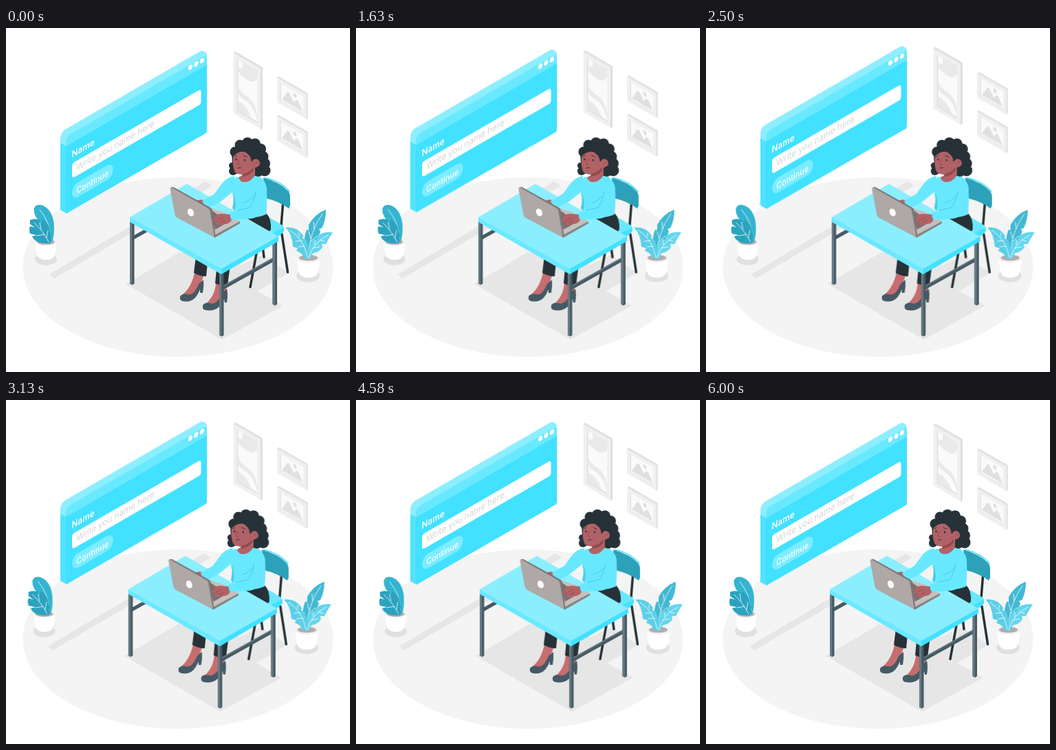
Recreate the animation shown at these times as an HTML page. Size 500x500 px, loop 6.04 s.

```html
<!DOCTYPE html>
<html lang="en">
<head>
<meta charset="utf-8">
<title>Name form</title>
<style>
html, body { margin: 0; width: 100%; height: 100%; overflow: hidden; background: #fff; }
svg { display: block; width: 100vw; height: 100vh; }
text { font-family: Inter, Roboto, sans-serif; font-weight: 500; }
.float { animation: float 6040ms linear infinite; }
.shake { animation: shake 6040ms linear infinite; }
/* four 1.5 s bobs, then a short rest */
@keyframes float {
  0%, 24.834%, 49.669%, 74.503%, 99.338%, 100% { transform: translateY(0); }
  12.417%, 37.252%, 62.086%, 86.921% { transform: translateY(-10px); }
}
/* one 6 s sway that grows and fades, then a short rest */
@keyframes shake {
  0%, 99.338%, 100% { transform: translateX(0); }
  9.934%, 89.404% { transform: translateX(-1px); }
  19.868%, 79.47% { transform: translateX(2px); }
  29.801%, 49.669%, 69.536% { transform: translateX(-4px); }
  39.735%, 59.603% { transform: translateX(4px); }
}
.line { fill: none; stroke-linecap: round; stroke-linejoin: round; }
.vein { fill: none; stroke: #fff; stroke-width: .8; stroke-linecap: round; }
.skin { fill: #b16266; }
.shin { fill: #c66d70; }
.hair { fill: #263238; }
.cloth { fill: #68e8ff; }
</style>
</head>
<body>
<svg viewBox="0 0 500 500">
  <defs>
    <g id="picture" transform="matrix(.866 .5 0 1 0 0)">
      <path fill="#e0e0e0" d="M0 0l3-3 48.500 0v36l-2 3z"/>
      <rect width="49" height="36" fill="#f0f0f0"/>
      <rect x="5" y="5" width="39" height="26" fill="#e0e0e0"/>
      <rect x="6.500" y="5" width="37.500" height="25" fill="#fafafa"/>
      <path fill="#e0e0e0" d="M8 28l9-15q2-2 4 0l7 9 4-5q2-2 4 0l7 11z"/>
      <circle cx="30" cy="11" r="3" fill="#e0e0e0"/>
    </g>
    <circle id="dot" r="3.600" fill="#fff" transform="matrix(.866 -.5 0 1 0 0)"/>
  </defs>

  <ellipse cx="250" cy="347.500" rx="225.500" ry="130.500" fill="#f4f4f4"/>

  <g class="float">
    <!-- browser window -->
    <path fill="#50e3ff" d="M79 160L88 165V269.500L79 264.500z"/>
    <path fill="#41e1ff" d="M87 168L292 50V149Q292 152 289.500 153.500L88 269.500L87 269z"/>
    <path fill="#8deeff" d="M79 167V161Q79 152 86 147.500L281 34.500Q284 32 287 33.500L290 35.500Q292.500 37 292 42L288 46L90 160L87 171.500z"/>
    <path fill="#69e9ff" d="M87 172V167Q87 158 94 154L287 42Q292 39.500 292 44V53.500z"/>
    <use href="#dot" transform="translate(268 57.200)"/>
    <use href="#dot" transform="translate(276.400 52.400)"/>
    <use href="#dot" transform="translate(284.800 47.500)"/>
    <g transform="matrix(.866 -.5 0 1 96 188)">
      <text x="-.5" y=".5" font-size="13.500" style="font-weight:600" fill="#fff">Name</text>
      <rect y="8.700" width="216.500" height="22" rx="4" fill="#fff"/>
      <text x="7.200" y="23.500" font-size="13.400" style="font-weight:400" fill="#d6d6d6">Write you name here</text>
      <rect y="41" width="69" height="21.500" rx="10.700" fill="#7eecff"/>
      <text x="7.300" y="57" font-size="12.500" fill="#fff">Continue</text>
    </g>

    <!-- wall pictures -->
    <g transform="matrix(.866 .5 0 1 330.500 36)">
      <path fill="#e0e0e0" d="M0 0l3-3.500h46V85l-3 4z"/>
      <rect width="45.500" height="88" fill="#f0f0f0"/>
      <rect x="6" y="6" width="34" height="76" fill="#e0e0e0"/>
      <rect x="8" y="6" width="32" height="74" fill="#fafafa"/>
      <path fill="#e9e9e9" d="M15 6H40V16Q36 27 25 28Q14 28 8 23V17Q19 17 15 6zM8 45Q14 53 24 52Q36 53 40 70V78Q34 60 20 59Q12 59 8 55zM8 66Q22 65 31 80H8z"/>
    </g>
    <use href="#picture" transform="translate(394 72)"/>
    <use href="#picture" transform="translate(394 128)"/>
  </g>

  <g class="shake">
    <!-- floor shapes -->
    <path fill="#e6e6e6" d="M63 358L290 223L300 229L70 364z"/>
    <path fill="#e6e6e6" d="M174 372L252 326L338 340L365 382L403 403.500L314 453z"/>
    <path fill="#e6e6e6" d="M320 355L366 382L411 356L372 330z"/>

    <!-- left plant -->
    <ellipse cx="58" cy="336" rx="16" ry="9" fill="#e0e0e0"/>
    <path fill="#fff" d="M43 311Q43 325 46 332Q50 337 58 337Q67 337 70 332Q73 325 73 311z"/>
    <ellipse cx="58" cy="311" rx="15" ry="5.500" fill="#f0f0f0"/>
    <ellipse cx="58" cy="311" rx="12.500" ry="4" fill="#b5abab"/>
    <path fill="#33b4d0" d="M64 312Q57 300 53 285Q40 275 40.500 263Q43 255 52 257.500Q66 262 69.500 283Q71 301 67 311z"/>
    <path class="vein" d="M65 306Q65 283 49 264"/>
    <path fill="#2ba3bf" d="M60 313Q43 314 38 303L45 301L35 299Q33 293 35 288L42 290L35 285V279Q42 276 49 279L50 284L53 278Q62 283 64 294Q67 306 64 313z"/>
    <path class="vein" d="M62 311Q54 295 41 283M56 300L45 302M51 292L49 283M59 305L61 294"/>

    <!-- chair -->
    <g class="line" stroke="#263238" stroke-width="3.500">
      <path d="M403 250L400 287M401 300L409.500 355M365 322L355 376.500M373 318L375 333"/>
    </g>
    <path fill="#2ca1b9" d="M374 217.500Q398 224 410 237Q413 240 413 246V258L411 262.500Q398 252 376 247z"/>
    <path class="line" stroke="#45dffc" stroke-width="1.600" d="M377 217.500Q400 223 412 237.500"/>
    <path class="cloth" d="M350 288L384 276L402 287Q405 290 403 293L382 304z"/>
    <path fill="#41e1ff" d="M378 303L404 290V295Q402 299 395 303L386 308z"/>

    <!-- legs -->
    <path class="shin" d="M274 356L287 361L282 374Q279 385 270 390L256 388Q269 378 274 356z"/>
    <path class="shin" d="M305 370L321 373Q320 384 314 393Q307 402 289 402Q304 390 305 370z"/>
    <path fill="#455a64" d="M253 390Q257 385 263 387Q273 390 280 372L287 366Q288 375 286 385L282 385V380Q276 395 267 397Q255 399 253 394z"/>
    <path fill="#455a64" d="M286 403Q289 398 296 400Q307 403 314 385L321 379Q323 387 321 399L318 399L317 394Q311 408 301 410Q288 412 286 407z"/>
    <path class="hair" d="M277 324L294 331L291 361Q282 361 273 356zM307 340L326 344L322 374Q312 375 304 371z"/>
    <path class="hair" d="M340 270L378 269Q386 277 385 293L380 299L340 286z"/>

    <!-- body -->
    <path class="cloth" d="M335 216Q346 220 361 213Q377 217 379 234Q380 255 378 271Q360 279 336 272Q332 262 333 249Q325 238 331 220z"/>
    <path fill="#42cde9" d="M331 241Q335 251 333 267L329 262Q332 250 330 242z"/>

    <!-- head -->
    <g class="hair">
      <path d="M328 182L345 165L370 172L380 192L378 211L362 215L330 211z"/>
      <circle cx="333" cy="180" r="7.500"/><circle cx="340" cy="170" r="7.500"/>
      <circle cx="351" cy="167" r="8"/><circle cx="362" cy="168.500" r="8"/>
      <circle cx="370" cy="176" r="8"/><circle cx="373" cy="187" r="8.500"/>
      <circle cx="376" cy="197" r="8"/><circle cx="376" cy="207" r="8.500"/>
      <circle cx="367" cy="209" r="7"/><circle cx="328.500" cy="200" r="4.500"/>
      <circle cx="330" cy="208" r="6"/>
    </g>
    <path class="skin" d="M344 200H362V214Q356 224 346 224Q340 224 338 217L344 214z"/>
    <path fill="#964749" d="M344 211Q354 209 359 201L360 207Q354 215 343 216z"/>
    <path class="skin" d="M331 184Q340 178 346 176Q355 181 358 193Q361 189 366 191Q371 195 368 200Q364 204 359 203Q354 211 343 212.500Q335 213 332 208Q328 197 331 184z"/>
    <path class="hair" d="M328 186Q331 174 344 174Q356 174 360 191L357 195Q356 184 347 180Q338 179 332 185z"/>
    <ellipse cx="334.500" cy="191" rx="1.200" ry="1.600" fill="#263238"/>
    <ellipse cx="347" cy="192" rx="1.200" ry="1.600" fill="#263238"/>
    <path class="line" stroke="#263238" stroke-width=".9" d="M332 187L335 185.500M345 185.500L350 187.500M337 203.500Q339.500 203 342 203"/>
    <path class="line" stroke="#964749" stroke-width=".9" d="M339 191L337 198L340 198.500M363 197Q364 194 366 195"/>

    <!-- table -->
    <g class="line" stroke-width="5" style="stroke-linecap:butt">
      <path stroke="#455a64" d="M183 306L208 292"/>
      <path stroke="#455a64" d="M313 379L390 336"/>
      <path stroke="#687a83" stroke-width="2" d="M313 376.500L390 333.500"/>
    </g>
    <g fill="#455a64">
      <path d="M180 280h6.500v91.500l-3 2-3.500-2z"/>
      <path d="M310 352h6.500v94.500l-3 2-3.500-2z"/>
      <path d="M387.500 308h6.500v93.500l-3 2-3.500-2z"/>
    </g>
    <g fill="#687a83">
      <path d="M180 280h3.300v93l-3.300-1.700z"/>
      <path d="M310 352h3.300v96l-3.300-1.700z"/>
      <path d="M387.500 308h3.300v95l-3.300-1.700z"/>
    </g>
    <path fill="#69e9ff" d="M180 275L313 349V358L180 282z"/>
    <path fill="#41e1ff" d="M313 349L396 302V310L313 358z"/>
    <path fill="#8beeff" d="M180 275L263 226.500L396 303L313 350z"/>

    <!-- far arm -->
    <path class="skin" d="M276 252Q283 247 291 252L296 258L288 263z"/>
    <path class="cloth" d="M332 215Q321 217 314 226L303 241L285 251.500Q288 259 295 261L311 253Q324 243 333 235z"/>

    <!-- laptop -->
    <path fill="#c6bfbd" d="M295 261L317 268L340 281L303 301z"/>
    <path fill="#898280" d="M303 301L340 281V284L304 304.500z"/>
    <path fill="#77706f" d="M296 263L323 282L304 293z"/>
    <path fill="#7d7675" d="M239 232L243 231L297 261Q299 262 300 265L304.500 303L303 305z"/>
    <path fill="#aea8a7" d="M238.500 234Q238 231 241 232L294 262Q296 263 296.500 266L303 304.500L249 276Q246 274 245.500 271z"/>
    <ellipse cx="268.500" cy="268" rx="4.300" ry="5.800" transform="rotate(-25 268.500 268)" fill="#fff"/>

    <!-- near arm -->
    <path class="skin" d="M326 271L314 270Q306 270 303 275L301 281Q304 283 309 279L305 285Q310 288 317 285Q325 285 328 279z"/>
    <path class="line" stroke="#964749" stroke-width=".8" d="M309 279L315 276M312 283L318 280"/>
    <path class="cloth" d="M369 219Q378 222 379 233Q378 254 371 268Q367 275 357 277L328 279Q325 274 326 268L352 262Q360 252 362 236z"/>
    <path class="line" stroke="#42cde9" stroke-width="1" d="M363 238Q361 252 354 261L337 265M345 254Q356 251 360 244"/>

    <!-- right plant -->
    <ellipse cx="439" cy="360" rx="17" ry="9.500" fill="#e0e0e0"/>
    <path fill="#fff" d="M423 335Q423 350 427 358Q431 363 439 363Q448 363 452 358Q456 350 456 335z"/>
    <ellipse cx="439.500" cy="335" rx="16.500" ry="6" fill="#f0f0f0"/>
    <ellipse cx="439.500" cy="334" rx="13.500" ry="4.300" fill="#b5abab"/>
    <path fill="#42b9d4" d="M437 335Q430 312 437 293L440 294V286Q449 270 465 264Q465 280 459 291L455 292L457 296Q450 310 441 335z"/>
    <path class="vein" d="M439 333Q441 296 460 270M443 306L440 296M442 311L452 302M448 292L447 282"/>
    <path fill="#5ccfe7" d="M406.500 290Q423 288 432 302L431 306L436 307Q441 320 440 335H434Q430 326 422 324L424 320L417 318Q416 300 406.500 290z"/>
    <path class="vein" d="M438 333Q434 308 413 294M430 309L421 310M434 317L425 318M426 303L426 298"/>
    <path fill="#64d6ed" d="M439 335Q438 316 448 306L451 308L452 303Q462 295 475 297Q469 306 465 314L459 314L460 319Q455 326 447 327Q443 330 443 336z"/>
    <path class="vein" d="M440 334Q446 312 468 301M446 320L456 318M449 315L449 309M456 308L463 310"/>
  </g>
</svg>
</body>
</html>
```
